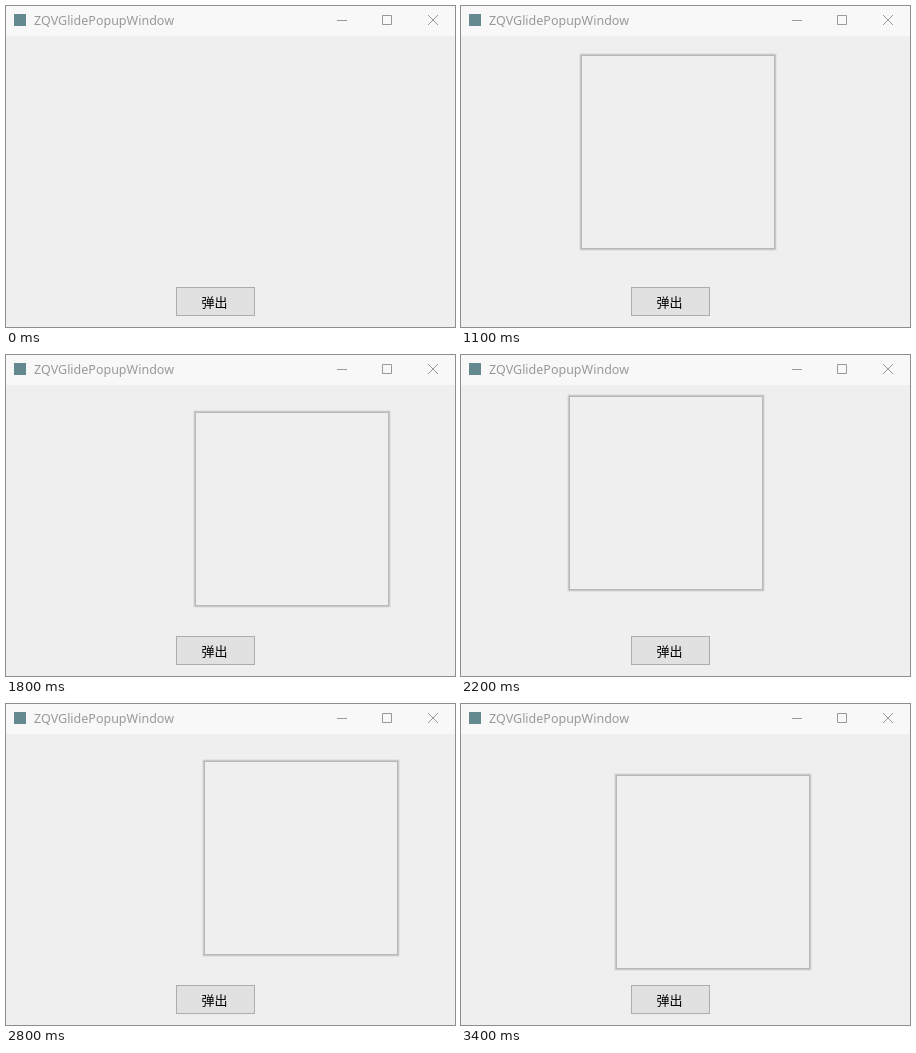
Recreate the animation shown at these times as an HTML page. Size 449 by 321 pixels, loop 4000 ms.

```html
<!DOCTYPE html>
<html lang="zh-CN">
<head>
<meta charset="utf-8">
<title>Popup window</title>
<style>
  html, body { margin: 0; width: 100%; height: 100%; overflow: hidden; background: #efefef; }
  svg { display: block; width: 449px; height: 321px; }
  .chrome, .button, .dialog { animation: 4s step-end infinite; }

  .chrome { color: #999; animation-name: activate; }
  .chrome text { font: 12.5px "Noto Sans", sans-serif; fill: currentColor; }
  .chrome path { fill: none; stroke: currentColor; }

  .button { fill: #e1e1e1; stroke: #adadad; animation-name: press; }
  .label { font: 13px "Noto Sans CJK SC", "Noto Sans CJK", sans-serif; fill: #000; }

  .dialog { visibility: hidden; animation-name: drag; }

  @keyframes activate {
    0% { color: #999; }
    17.5% { color: #000; }
    22.5%, 100% { color: #999; }
  }
  @keyframes press {
    0% { fill: #e1e1e1; stroke: #adadad; }
    15% { fill: #e5f1fb; stroke: #0078d7; }
    17.5% { fill: #cce4f7; stroke: #005499; }
    20% { fill: #e5f1fb; stroke: #0078d7; }
    22.5%, 100% { fill: #e1e1e1; stroke: #adadad; }
  }
  /* The dialog follows the pointer in 100 ms steps */
  @keyframes drag {
    0% { visibility: hidden; transform: translate(128px, 78px); }
    22.5% { visibility: visible; transform: translate(128px, 78px); }
    25% { visibility: visible; transform: translate(124px, 62px); }
    27.5% { visibility: visible; transform: translate(120px, 49px); }
    35% { visibility: visible; transform: translate(100px, 62px); }
    37.5% { visibility: visible; transform: translate(62px, 86px); }
    40% { visibility: visible; transform: translate(44px, 96px); }
    42.5% { visibility: visible; transform: translate(120px, 79px); }
    45% { visibility: visible; transform: translate(189px, 57px); }
    47.5% { visibility: visible; transform: translate(198px, 54px); }
    50% { visibility: visible; transform: translate(140px, 55px); }
    52.5% { visibility: visible; transform: translate(68px, 47px); }
    55% { visibility: visible; transform: translate(108px, 41px); }
    57.5% { visibility: visible; transform: translate(154px, 62px); }
    60% { visibility: visible; transform: translate(192px, 86px); }
    62.5% { visibility: visible; transform: translate(198px, 91px); }
    65% { visibility: visible; transform: translate(190px, 82px); }
    67.5% { visibility: visible; transform: translate(190px, 68px); }
    70% { visibility: visible; transform: translate(198px, 57px); }
    72.5% { visibility: visible; transform: translate(136px, 48px); }
    75% { visibility: visible; transform: translate(84px, 60px); }
    77.5% { visibility: visible; transform: translate(119px, 78px); }
    80% { visibility: visible; transform: translate(140px, 77px); }
    82.5% { visibility: visible; transform: translate(151px, 73px); }
    85%, 100% { visibility: visible; transform: translate(155px, 71px); }
  }
</style>
</head>
<body>
<svg viewBox="0 0 449 321">
  <rect width="449" height="321" fill="#efefef"/>
  <rect width="449" height="30" fill="#f8f8f8"/>
  <rect x="8" y="8" width="12" height="12" fill="#64898e"/>

  <g class="chrome">
    <text x="28" y="19">ZQVGlidePopupWindow</text>
    <path d="M331 14.5h10M376.5 9.5h9v9h-9z"/>
    <path d="M422 9l10 10M432 9l-10 10"/>
  </g>

  <rect class="button" x="170.5" y="281.5" width="78" height="28"/>
  <text class="label" x="195.5" y="301">弹出</text>

  <g class="dialog">
    <rect x="-3" y="-3" width="200" height="200" fill="#efefef"/>
    <rect x="-2" y="-2" width="198" height="198" rx="2" fill="#e3e3e3"/>
    <rect x="-1" y="-1" width="196" height="196" rx="1" fill="#c9c9c9"/>
    <rect x=".5" y=".5" width="193" height="193" fill="#efefef" stroke="#b8b8b8"/>
  </g>
</svg>
</body>
</html>
```
